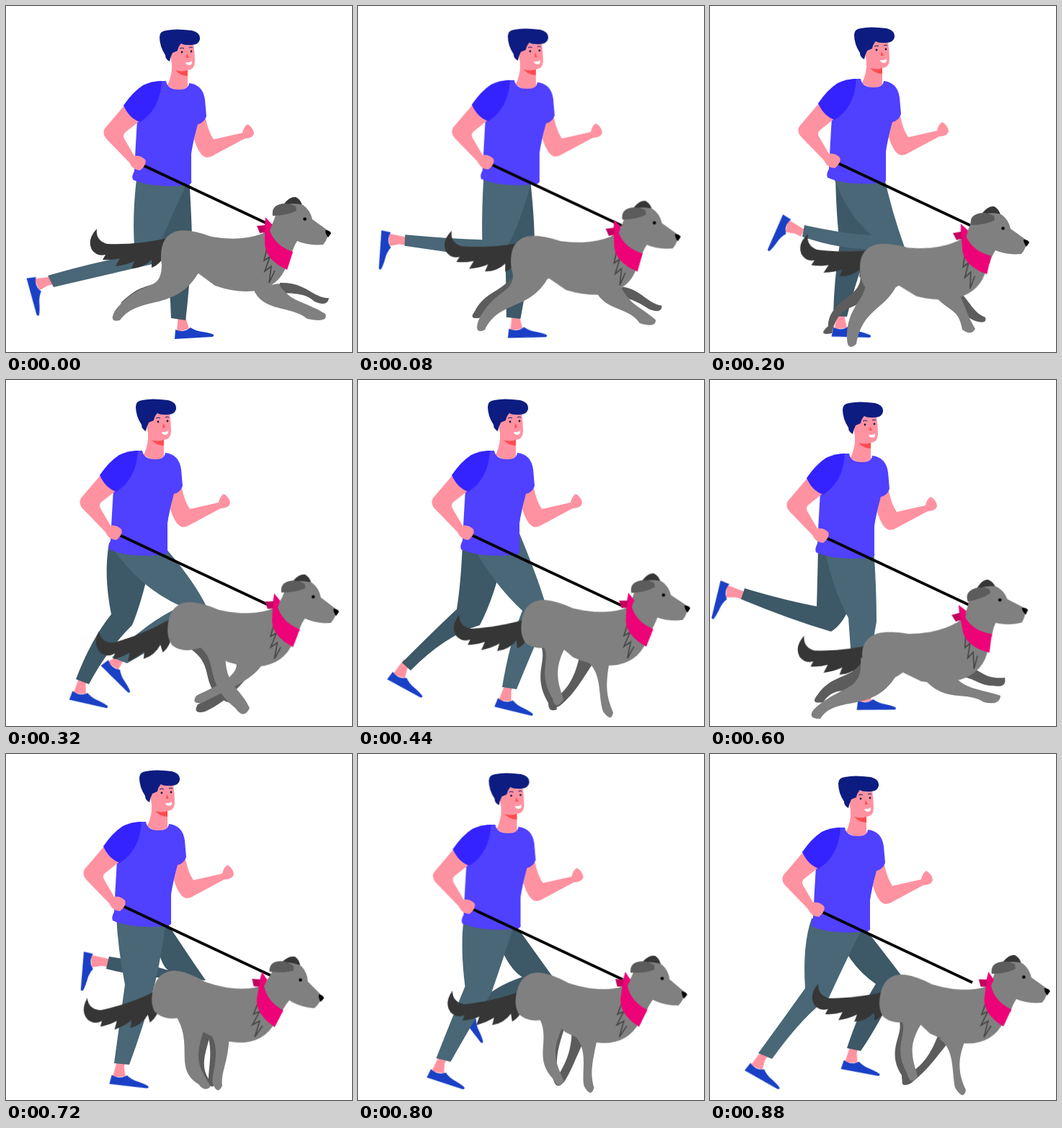
Animation of 480x480 px, one loop 920 ms. Source, as an HTML page without scripts:

```html
<!DOCTYPE html>
<html lang="en">
<head>
<meta charset="utf-8">
<title>Running with the dog</title>
<style>
html,body{margin:0;width:100%;height:100%;overflow:hidden;background:#fff}
svg{display:block;width:100%;height:100%}
/* every pose is held for 40 ms: steps() counts the 40 ms ticks to the next key */
[id]{animation:.92s -2ms infinite}
.skin{fill:#ff92a1}
.shoe{fill:#1a40c6}
.near{fill:#496776}
.far{fill:#3d5866}
.fur{fill:#808080}
.shade{fill:#5c5c5c}
.tail{fill:#363636}

#torso{animation-name:torso}
@keyframes torso{
0%{transform:translate(0,0);animation-timing-function:steps(5)}
21.7391%{transform:translate(-13px,-3px);animation-timing-function:steps(3)}
34.7826%,47.8261%{transform:translate(-33px,-6px);animation-timing-function:steps(4)}
65.2174%{transform:translate(-29px,-2px);animation-timing-function:steps(3)}
78.2609%{transform:translate(-28px,-10px);animation-timing-function:steps(4)}
95.6522%{transform:translate(-35px,-2px);animation-timing-function:steps(1)}
}

#nearLeg{animation-name:nearLeg}
@keyframes nearLeg{
0%{d:path("M182 232Q174 295 179 345Q120 356 58 374L66 390Q165 367 203 358Q218 315 255 238Z");animation-timing-function:steps(3)}
13.0435%{d:path("M171 232Q170 280 169 314Q126 306 69 289L64 304Q131 332 189 349Q221 330 236 235Z");animation-timing-function:steps(2)}
21.7391%{d:path("M170 234Q190 290 224 318Q185 316 131 304L128 320Q200 345 270 335Q252 285 241 234Z");animation-timing-function:steps(3)}
34.7826%{d:path("M147 232Q185 288 243 314Q195 335 147 385L168 393Q235 355 280 318Q262 280 222 234Z");animation-timing-function:steps(3)}
47.8261%{d:path("M160 232Q190 285 228 320Q210 365 200 426L220 429Q240 380 264 325Q254 285 222 208Z");animation-timing-function:steps(4)}
65.2174%{d:path("M159 234Q170 290 192 330Q195 380 200 430L222 430Q222 380 231 335Q231 285 227 234Z");animation-timing-function:steps(3)}
78.2609%{d:path("M153 224Q155 270 165 320Q158 370 150 429L171 431Q190 380 205 325Q215 285 223 226Z");animation-timing-function:steps(4)}
95.6522%{d:path("M141 228Q128 265 132 325Q100 370 67 415L86 423Q130 362 165 338Q183 298 215 234Z");animation-timing-function:steps(1)}
}

#farLeg{animation-name:farLeg}
@keyframes farLeg{
0%{d:path("M200 236Q205 300 220 340Q228 390 229 433L249 436Q255 390 258 320Q257 285 254 236Z");animation-timing-function:steps(5)}
21.7391%{d:path("M174 234Q175 290 180 330Q172 380 171 430L190 431Q205 370 225 325Q225 290 215 234Z");animation-timing-function:steps(3)}
34.7826%{d:path("M143 226Q135 270 146 325Q118 360 97 415L115 422Q140 375 175 340Q190 305 205 232Z");animation-timing-function:steps(3)}
47.8261%{d:path("M145 226Q143 280 137 318Q109 344 61 392L73 403Q120 355 169 340Q190 300 205 232Z");animation-timing-function:steps(2)}
56.5217%{d:path("M148 230Q147 285 148 328Q90 333 27 331L30 348Q120 347 172 350Q195 315 210 233Z");animation-timing-function:steps(2)}
65.2174%{d:path("M150 232Q149 280 148 314Q105 306 48 289L43 304Q110 332 168 349Q200 330 215 234Z");animation-timing-function:steps(3)}
78.2609%{d:path("M205 228Q210 290 225 300Q180 286 143 281L139 298Q190 312 277 314Q250 275 218 226Z");animation-timing-function:steps(4)}
95.6522%{d:path("M170 235Q190 292 230 319Q207 355 190 408L209 412Q235 375 266 308Q245 280 208 233Z");animation-timing-function:steps(1)}
}

#nearFoot{animation-name:nearFoot}
@keyframes nearFoot{
0%{transform:translate(56px,377px) rotate(78deg);animation-timing-function:steps(3)}
13.0435%{transform:translate(60px,291px) rotate(107deg);animation-timing-function:steps(2)}
21.7391%{transform:translate(123px,306px) rotate(117deg);animation-timing-function:steps(3)}
34.7826%{transform:translate(155px,382px) rotate(48deg);animation-timing-function:steps(3)}
47.8261%{transform:translate(202px,429px) rotate(17deg);animation-timing-function:steps(4)}
65.2174%{transform:translate(210px,431px) rotate(3deg);animation-timing-function:steps(3)}
78.2609%{transform:translate(153px,432px) rotate(10deg);animation-timing-function:steps(4)}
95.6522%{transform:translate(67px,419px) rotate(33deg);animation-timing-function:steps(1)}
}

#farFoot{animation-name:farFoot}
@keyframes farFoot{
0%{transform:translate(239px,435px) rotate(0deg);animation-timing-function:steps(5)}
21.7391%{transform:translate(176px,432px) rotate(5deg);animation-timing-function:steps(3)}
34.7826%{transform:translate(100px,419px) rotate(16deg);animation-timing-function:steps(3)}
47.8261%{transform:translate(59px,395px) rotate(32deg);animation-timing-function:steps(2)}
56.5217%{transform:translate(24px,335px) rotate(92deg);animation-timing-function:steps(2)}
65.2174%{transform:translate(39px,291px) rotate(107deg);animation-timing-function:steps(3)}
78.2609%{transform:translate(134px,283px) rotate(98deg);animation-timing-function:steps(4)}
95.6522%{transform:translate(193px,412px) rotate(14deg);animation-timing-function:steps(1)}
}

#trunk,#collar{animation-name:trunk}
@keyframes trunk{
0%{transform:translate(360px,294px) rotate(0deg);animation-timing-function:steps(5)}
21.7391%{transform:translate(348px,303px) rotate(-5deg);animation-timing-function:steps(3)}
34.7826%{transform:translate(372px,297px) rotate(3deg);animation-timing-function:steps(3)}
47.8261%{transform:translate(375px,296px) rotate(4deg);animation-timing-function:steps(2)}
56.5217%{transform:translate(361px,297px) rotate(-3deg);animation-timing-function:steps(2)}
65.2174%{transform:translate(345px,313px) rotate(-10.5deg);animation-timing-function:steps(3)}
78.2609%{transform:translate(355px,303px) rotate(9.5deg);animation-timing-function:steps(4)}
95.6522%{transform:translate(386px,303px) rotate(7deg);animation-timing-function:steps(1)}
}

#head{animation-name:head;transform-origin:20px 6px}
@keyframes head{
0%{transform:translate(0,0) rotate(0deg);animation-timing-function:steps(5)}
21.7391%{transform:translate(3px,6px) rotate(5deg);animation-timing-function:steps(3)}
34.7826%{transform:translate(0,0) rotate(-1deg);animation-timing-function:steps(3)}
47.8261%{transform:translate(-5px,1px) rotate(-6deg);animation-timing-function:steps(4)}
65.2174%{transform:translate(3px,0) rotate(2deg);animation-timing-function:steps(3)}
78.2609%{transform:translate(0,0) rotate(0deg);animation-timing-function:steps(4)}
95.6522%{transform:translate(-4px,3px) rotate(-7deg);animation-timing-function:steps(1)}
}

#tail{animation-name:tail}
@keyframes tail{
0%{transform:translate(220px,330px) rotate(0deg);animation-timing-function:steps(5)}
21.7391%{transform:translate(228px,345px) rotate(5deg);animation-timing-function:steps(3)}
34.7826%{transform:translate(225px,341px) rotate(-17deg);animation-timing-function:steps(3)}
47.8261%{transform:translate(236px,338px) rotate(-5deg);animation-timing-function:steps(4)}
65.2174%{transform:translate(225px,374px) rotate(-1deg);animation-timing-function:steps(3)}
78.2609%{transform:translate(209px,336px) rotate(-14deg);animation-timing-function:steps(4)}
95.6522%{transform:translate(245px,336px) rotate(-2deg);animation-timing-function:steps(1)}
}

#nearHind{animation-name:nearHind}
@keyframes nearHind{
0%{d:path("M216 350C218 405 192 372 151 423Q142 440 158 436C185 400 235 425 267 370Z");animation-timing-function:steps(5)}
21.7391%{d:path("M208 365C232 405 190 405 190 460Q190 480 203 469C212 418 245 422 261 383Z");animation-timing-function:steps(3)}
34.7826%{d:path("M262 365C300 390 270 415 318 455Q330 472 338 455C325 425 300 425 305 368Z");animation-timing-function:steps(3)}
47.8261%{d:path("M250 358C275 385 245 400 270 442Q274 460 285 443C278 420 268 400 294 360Z");animation-timing-function:steps(2)}
56.5217%{d:path("M216 352C218 407 192 374 151 425Q142 442 158 438C185 402 235 427 267 372Z");animation-timing-function:steps(2)}
65.2174%{d:path("M209 385C212 435 185 420 144 457Q134 470 153 470C175 435 230 465 261 405Z");animation-timing-function:steps(3)}
78.2609%{d:path("M230 355C265 400 230 435 267 458Q276 470 284 461C265 430 258 420 284 360Z");animation-timing-function:steps(4)}
95.6522%{d:path("M260 358C282 385 250 400 273 442Q278 462 288 447C280 420 272 400 302 362Z");animation-timing-function:steps(1)}
}

#farHind{animation-name:farHind}
@keyframes farHind{
0%{d:path("M215 382C185 393 183 390 160 411Q156 420 170 418C190 400 205 410 225 400Z");animation-timing-function:steps(5)}
21.7391%{d:path("M208 370C215 405 165 405 164 444Q148 458 169 454C180 410 200 425 225 400Z");animation-timing-function:steps(3)}
34.7826%{d:path("M252 370C290 395 270 415 295 440Q318 455 310 440C300 420 305 415 300 365Z");animation-timing-function:steps(3)}
47.8261%{d:path("M248 360C270 385 238 405 264 448Q264 462 276 457C270 425 265 405 285 360Z");animation-timing-function:steps(2)}
56.5217%{d:path("M215 384C185 395 183 392 160 413Q156 422 170 420C190 402 205 412 225 402Z");animation-timing-function:steps(2)}
65.2174%{d:path("M212 385C205 415 170 405 149 437Q138 450 157 447C175 420 195 440 225 420Z");animation-timing-function:steps(3)}
78.2609%{d:path("M250 360C270 395 255 420 275 455Q285 468 284 455C265 430 280 410 290 365Z");animation-timing-function:steps(4)}
95.6522%{d:path("M257 360C278 385 240 405 266 446Q266 465 280 456C275 425 275 400 295 362Z");animation-timing-function:steps(1)}
}

#nearFore{animation-name:nearFore}
@keyframes nearFore{
0%{d:path("M343 392C355 425 395 415 418 434Q448 440 443 427C412 408 395 412 378 385Z");animation-timing-function:steps(5)}
21.7391%{d:path("M308 398C330 425 345 418 350 449Q362 458 368 448C355 425 358 425 345 398Z");animation-timing-function:steps(3)}
34.7826%{d:path("M320 382C330 410 290 425 264 438Q256 450 272 448C315 425 350 415 362 382Z");animation-timing-function:steps(3)}
47.8261%{d:path("M315 388C340 405 332 435 340 460Q352 476 354 461C345 440 342 425 350 385Z");animation-timing-function:steps(2)}
56.5217%{d:path("M343 394C355 427 395 417 418 436Q448 442 443 429C412 410 395 414 378 387Z");animation-timing-function:steps(2)}
65.2174%{d:path("M295 412C325 450 355 430 380 447Q402 452 403 438C375 428 350 430 335 405Z");animation-timing-function:steps(3)}
78.2609%{d:path("M280 382C302 410 284 440 287 458Q294 474 300 460C298 440 308 430 310 390Z");animation-timing-function:steps(4)}
95.6522%{d:path("M318 395C340 410 335 440 340 463Q352 482 355 466C345 445 342 425 355 395Z");animation-timing-function:steps(1)}
}

#farFore{animation-name:farFore}
@keyframes farFore{
0%{d:path("M374 398C390 400 412 395 428 410Q446 418 448 405C425 405 415 382 380 384Z");animation-timing-function:steps(5)}
21.7391%{d:path("M332 402C350 415 350 430 368 437Q385 442 382 432C365 425 362 412 348 398Z");animation-timing-function:steps(3)}
34.7826%{d:path("M315 385C335 400 290 440 266 450Q258 464 276 460C310 445 335 415 350 390Z");animation-timing-function:steps(3)}
47.8261%{d:path("M308 380C300 420 285 435 268 445Q262 462 280 452C300 435 305 425 328 390Z");animation-timing-function:steps(2)}
56.5217%{d:path("M374 400C390 402 412 397 428 412Q446 420 448 407C425 407 415 384 380 386Z");animation-timing-function:steps(2)}
65.2174%{d:path("M348 412C365 412 375 425 393 424Q412 428 409 413C385 415 380 407 365 400Z");animation-timing-function:steps(3)}
78.2609%{d:path("M275 375C290 410 280 435 281 455Q286 468 291 455C290 440 292 420 300 385Z");animation-timing-function:steps(4)}
95.6522%{d:path("M318 385C305 425 285 440 268 448Q262 466 281 455C305 435 310 425 335 395Z");animation-timing-function:steps(1)}
}
</style>
</head>
<body>
<svg viewBox="0 0 480 480">
  <defs>
    <g id="foot">
      <path class="skin" d="M0-9H11V0L15 13L-2 17Z"/>
      <path class="shoe" d="M-4 14Q8 19 17 11Q24 16 34 17Q46 19 49 21Q50 24 46 24L-5 27Z"/>
    </g>
  </defs>

  <!-- runner's legs -->
  <use id="farFoot" href="#foot"/>
  <path id="farLeg" class="far"/>
  <use id="nearFoot" href="#foot"/>
  <path id="nearLeg" class="near"/>

  <!-- runner's upper body and leash -->
  <g id="torso">
    <path class="skin" d="M266 160L261 185Q268 208 278 210Q284 210 288 207L331 184Q342 184 344 177Q343 168 335 164Q330 167 328 176L288 185Q281 175 277 156Z"/>
    <path class="skin" d="M224 110Q231 95 230 80L228 68Q232 60 243 52Q255 57 260 52Q262 65 262 78Q261 89 252 89V112Q240 122 224 110Z"/>
    <path fill="#ff4b4f" d="M235 89Q244 92 252 89V97Q242 97 235 89Z"/>
    <path fill="#0d1c80" d="M227 77Q221 74 221 68Q213 56 213 43Q213 35 222 34Q235 31 258 34Q270 37 269 46Q268 53 258 54Q248 55 243 52Q239 56 238 62L231 65Q228 71 227 77Z"/>
    <path fill="none" stroke="#0d1c80" d="M241 59Q244 57 247 59M254 58Q257 56 259 58"/>
    <g fill="#1b1b3a"><circle cx="244" cy="64" r="1.4"/><circle cx="257" cy="63" r="1.4"/></g>
    <path fill="#ff4b4f" d="M251 66L254 72L250 72Z"/>
    <path fill="#fff" d="M249 78Q255 79 258 76Q259 82 254 82Q250 82 249 78Z"/>
    <path fill="#5040ff" d="M222 104Q224 116 240 116Q253 116 254 107Q273 109 276 130L278 153Q275 162 266 164Q259 190 257 205V242Q259 249 246 249Q200 252 176 241Q174 236 178 229Q180 190 182 158L190 111Q205 103 222 104Z"/>
    <path stroke="#000" stroke-width="3.7" d="M186 219L399 319"/>
    <path class="skin" d="M165 137L137 170Q133 177 139 184L171 217Q176 228 186 228Q196 220 193 213Q187 207 178 208L164 184Q161 178 167 174L186 159Z"/>
    <path fill="#3423ff" d="M216 104Q202 104 190 110Q176 119 163 138Q171 156 186 161Q214 143 216 104Z"/>
  </g>

  <!-- dog -->
  <path id="tail" class="tail" d="M-94-21Q-108-6-101 8Q-94 18-82 15L-86 22Q-74 23-62 20L-68 31Q-52 29-42 24L-46 34Q-30 34-18 22L-18 33Q-4 28 4 8L4-8Q-40 2-80 0Q-96-5-94-21Z"/>
  <path id="farHind" class="shade"/>
  <path id="farFore" class="shade"/>
  <path id="nearHind" class="fur"/>
  <path id="nearFore" class="fur"/>
  <g id="trunk"><g transform="translate(-360 -294)">
    <path class="fur" d="M215 350Q214 318 238 312Q255 309 285 320Q325 327 355 316Q372 306 376 285L405 300Q408 320 392 350Q385 385 352 394Q325 400 290 388L267 371Q240 385 222 372Q215 362 215 350Z"/>
    <path fill="none" stroke="#444" stroke-width="1.6" d="M362 336L358 353L366 348L359 368L368 361L365 384L373 367"/>
  </g></g>
  <g id="collar">
    <g id="head"><g transform="translate(-360 -294)">
      <path class="tail" d="M386 274Q394 264 402 265Q410 269 411 278Q398 274 386 276Z"/>
      <path class="fur" d="M366 312Q374 292 377 280Q395 271 412 276Q422 283 425 296L446 311Q449 320 440 331Q420 333 404 326Q398 335 396 345Z"/>
      <path class="shade" d="M370 291Q368 278 380 275Q390 272 402 278L403 284Q390 291 370 291Z"/>
      <circle cx="414.500" cy="295.500" r="2.300"/>
      <path d="M443 311Q449 311 451 315L447 321Q443 316 443 311Z"/>
    </g></g>
    <g transform="translate(-360 -294)">
      <path fill="#ee0277" d="M360 293L369 303L366 312Q374 333 398 341L390 366Q360 352 359 330V304Z"/>
      <path fill="#c2035f" d="M348 305L360 304L359 314L352 315Z"/>
    </g>
  </g>
</svg>
</body>
</html>
```
